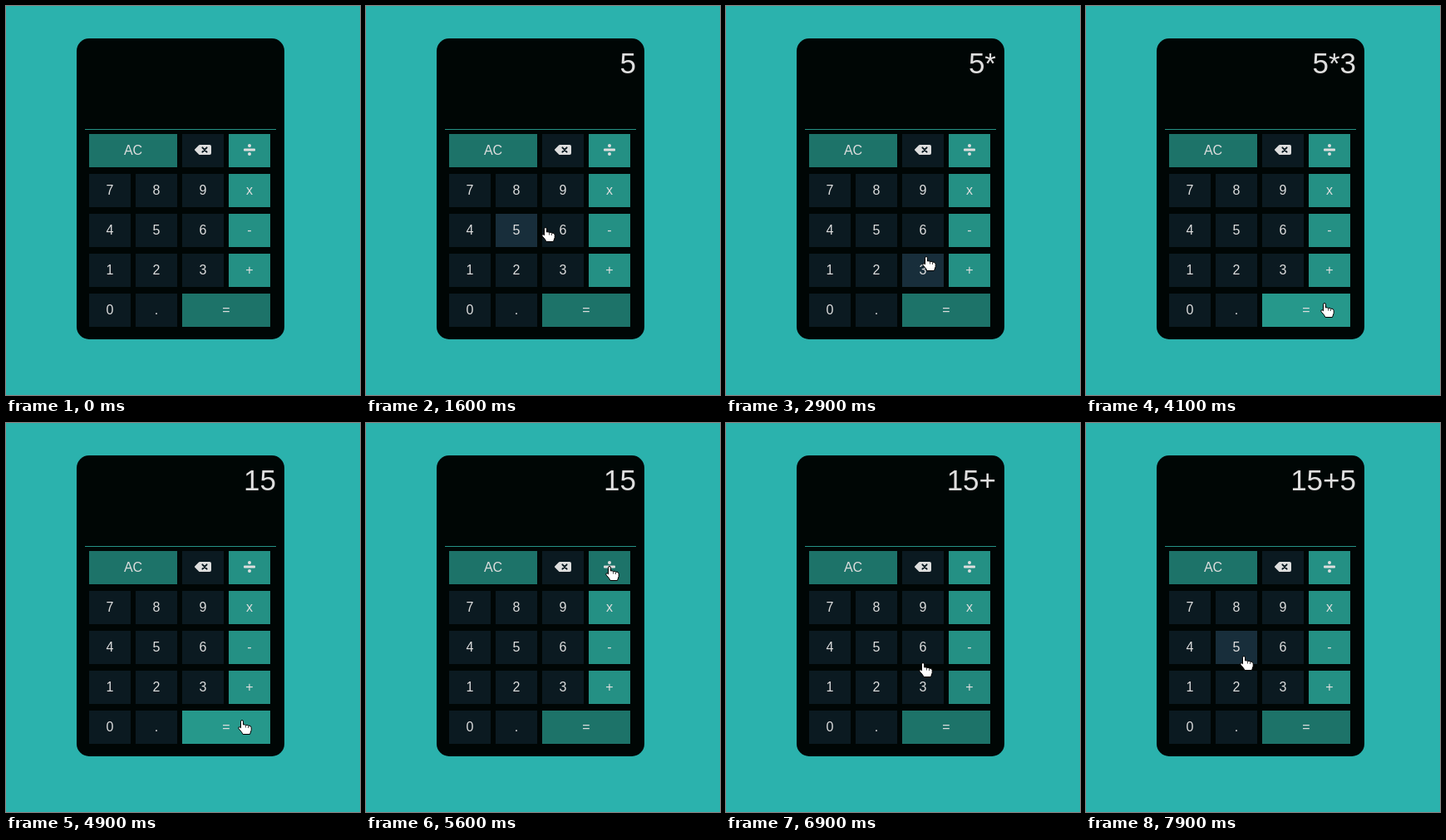
An HTML page for the animation above (8 s loop, 426 by 468 pixels).

```html
<!DOCTYPE html>
<html lang="en">
<head>
<meta charset="utf-8">
<title>Calculator</title>
<style>
  html, body { margin: 0; width: 100%; height: 100%; overflow: hidden; background: #2bb2ad; }
  body { font: 16px/40px "Liberation Sans", Arial, sans-serif; color: #dedede; }
  #calculator { position: absolute; left: 85px; top: 39px; width: 250px; height: 362px; border-radius: 15px; background: #000605; }
  #display { position: absolute; left: 10px; top: 10px; width: 230px; height: 99px; border-bottom: 1px solid #269386; font-size: 35px; line-height: 39px; text-align: right; }
  #keys { position: absolute; left: 15px; top: 115px; display: grid; grid: auto-flow 40px / repeat(4, 50px); gap: 8px 6px; text-align: center; }
  .wide { grid-column: span 2; }
  #keys svg { display: block; margin: 11px auto; fill: currentColor; }
  .pointer { position: absolute; left: 0; top: 0; fill: #fff; stroke: #000; stroke-linejoin: round; }
</style>
</head>
<body>
<div id="calculator">
  <div id="display"></div>
  <div id="keys"></div>
</div>
<svg id="hand" class="pointer" width="20" height="20">
  <path d="M3.500 2.200q0-1.700 1.500-1.700t1.500 1.700V6q1.600-.8 3 .5 1.700-.7 3 .6 3.500-.5 3.700 2.400V12.500L14.500 17.500H6L4.300 14.500 1 10.800Q.2 8.600 2.200 8.700L3.500 9.800z"/>
  <path d="M9.500 7v2.500m3-2v2.500" stroke-width=".7"/>
</svg>
<svg id="arrow" class="pointer" width="20" height="20">
  <path d="M.5 .5V15.500L4 12.200l2.400 5.600 2.400-1L6.400 11.300H11.300z"/>
</svg>
<script>
const LOOP = 8000, STEP = 100;
const TIP = { x: 5, y: 1 };
const COLORS = {
  digit: { base: [11, 26, 33], hover: [24, 46, 59] },
  operator: { base: [36, 144, 132], hover: [29, 115, 105] },
  wide: { base: [29, 115, 105], hover: [38, 152, 139] }
};
const ICONS = {
  del: `<svg width="20" height="16"><path d="M18 2H6.400a2 2 0 0 0-1.400.6L.3 7.300a1 1 0 0 0 0 1.400L5 13.400a2 2 0 0 0 1.400.6H18a2 2 0 0 0 2-2V4a2 2 0 0 0-2-2z"/>
    <path d="M9.400 5.400l5.200 5.200m0-5.200l-5.200 5.200" stroke="#0b1a21" stroke-width="2" stroke-linecap="round"/></svg>`,
  div: `<svg width="14" height="16"><rect y="6.500" width="14" height="3" rx="1"/><circle cx="7" cy="3" r="2"/><circle cx="7" cy="13" r="2"/></svg>`
};

const $ = id => document.getElementById(id);

const keys = 'AC del div 7 8 9 x 4 5 6 - 1 2 3 + 0 . ='.split(' ').map(label => {
  const el = $('keys').appendChild(document.createElement('div'));
  const kind = ['AC', '='].includes(label) ? 'wide' : ['div', 'x', '-', '+'].includes(label) ? 'operator' : 'digit';
  el.className = kind;
  el.innerHTML = ICONS[label] || label;
  return { el, colors: COLORS[kind] };
});
for (const key of keys) key.box = key.el.getBoundingClientRect();

const speedUp = k => k ** 3;
const slowDown = k => 1 - (1 - k) ** 3;

// The pointer rests between moves; a press happens as its move begins.
const ENTRY = { start: 200, x: 371, y: 347 };
const moves = [
  { start: 200, end: 1000, x: 181, y: 274, ease: slowDown },
  { start: 1300, end: 1600, x: 211, y: 266, ease: speedUp, press: '5' },
  { start: 1600, end: 2300, x: 290, y: 227, ease: slowDown },
  { start: 2500, end: 2900, x: 236, y: 301, ease: slowDown, press: '*' },
  { start: 2900, end: 3200, x: 232, y: 310, ease: slowDown },
  { start: 3400, end: 3700, x: 262, y: 404, ease: slowDown, press: '3' },
  { start: 3700, end: 4200, x: 282, y: 357, ease: slowDown },
  { start: 4400, end: 4900, x: 279, y: 357, ease: slowDown, press: '=' },
  { start: 4900, end: 5100, x: 291, y: 313, ease: slowDown },
  { start: 5300, end: 5600, x: 288, y: 172, ease: slowDown },
  { start: 5600, end: 6100, x: 299, y: 275, ease: speedUp },
  { start: 6100, end: 6400, x: 293, y: 308, ease: slowDown },
  { start: 6700, end: 7600, x: 177, y: 271, ease: slowDown, press: '+' },
  { start: 7800, end: 7900, x: 185, y: 280, ease: slowDown, press: '5' }
];

function pointerAt(t) {
  if (t < ENTRY.start) return null;
  let { x, y } = ENTRY;
  for (const move of moves) {
    if (t < move.start) break;
    const k = move.ease(Math.min(1, (t - move.start) / (move.end - move.start)));
    x += (move.x - x) * k;
    y += (move.y - y) * k;
  }
  return { x, y };
}

const product = text => String(text.split('*').reduce((a, b) => a * b));

const displayAt = t => moves
  .filter(move => move.press && move.start <= t)
  .reduce((text, { press }) => press === '=' ? product(text) : text + press, '');

function isOver({ box }, p) {
  if (!p) return false;
  const x = p.x + TIP.x, y = p.y + TIP.y;
  return x >= box.left && x < box.right && y >= box.top && y < box.bottom;
}

// A slightly delayed 100 ms linear fade.
function hoverAmount(key, t) {
  let hits = 0;
  for (let lag = 45; lag < 145; lag += 10) hits += isOver(key, pointerAt(t - lag));
  return hits / 10;
}

function placePointer(id, visible, x, y) {
  $(id).style.display = visible ? '' : 'none';
  if (visible) $(id).style.transform = `translate(${Math.round(x)}px, ${Math.round(y)}px)`;
}

function draw(t) {
  $('display').textContent = displayAt(t);
  for (const key of keys) {
    const k = hoverAmount(key, t), { base, hover } = key.colors;
    key.el.style.background = `rgb(${base.map((c, i) => Math.round(c + (hover[i] - c) * k))})`;
  }
  const p = pointerAt(t);
  const overKey = keys.some(key => isOver(key, p));
  placePointer('hand', p && overKey, p?.x, p?.y);
  placePointer('arrow', p && !overKey, p?.x + TIP.x, p?.y + TIP.y);
}

const start = performance.now();
function tick() {
  const t = (performance.now() - start) % LOOP;
  draw(Math.floor(t / STEP) * STEP);
  requestAnimationFrame(tick);
}
tick();
</script>
</body>
</html>
```
